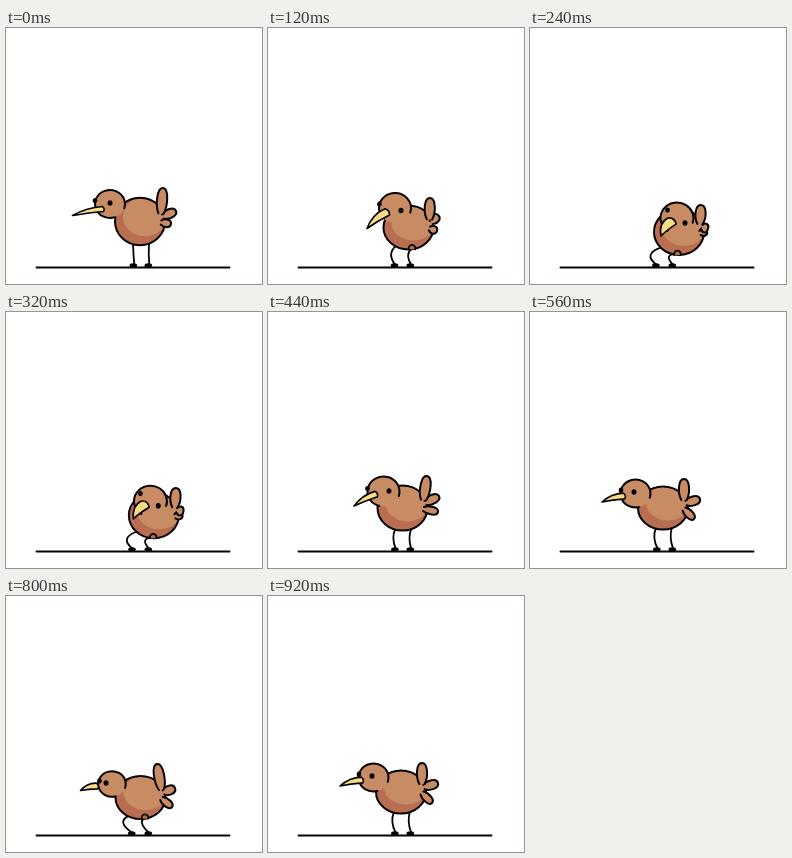
These frames come from a looping animation (256x256 px, 0.96 s). An HTML page with a canvas:

```html
<!DOCTYPE html>
<html lang="en">
<head>
<meta charset="utf-8">
<title>Bird</title>
<style>
html, body { margin: 0; width: 100%; height: 100%; overflow: hidden; background: #fff; }
canvas { display: block; width: 256px; height: 256px; }
</style>
</head>
<body>
<canvas id="stage" width="256" height="256"></canvas>
<script>
const ctx = document.getElementById('stage').getContext('2d');
const INK = '#050304', LIGHT = '#c88c64', SHADE = '#b96e52', YELLOW = '#f4dc84';
const LOOP = 960;

// body: x, y, ry | head: x, y, rx, neck angle | bill: base, tip, half width
// eyes: near, far | tips: three tail feathers | legs: right hip, bend
const poses = [
  { body: [134, 193.5, 23.7], head: [104, 176, 15, 70], bill: [97, 181, 66.5, 187.5, 2.5],
    eyes: [104, 175, 89, 172.5], tips: [157, 160, 170, 183, 165, 196], legs: [143, 0] },
  { body: [140.5, 199.5, 22], head: [127, 180, 16, 140], bill: [119, 184, 99, 200.5, 4],
    eyes: [133, 182.5, 111.5, 176], tips: [162, 170, 170, 187, 169, 203], legs: [144, 4] },
  { body: [149, 204, 23], head: [147, 190, 16.5, 125], bill: [142, 193, 131, 208, 5.2],
    eyes: [155, 195, 137.5, 182], tips: [171, 177, 178, 201, 177, 203], legs: [147.5, 7] },
  { body: [134.5, 196, 22.5], head: [115.5, 179.5, 16, 105], bill: [108, 182, 86, 194, 3],
    eyes: [121, 179, 99.5, 176.5], tips: [159, 164, 171, 184, 170, 200], legs: [143.5, 2] },
  { body: [133, 196, 21.5], head: [105.5, 181.5, 15, 75], bill: [94, 184, 72, 190, 3],
    eyes: [104, 180, 91, 178], tips: [154, 167, 170, 187, 164, 207], legs: [142, 2.5] },
  { body: [134.5, 201.5, 21.5], head: [106, 188, 13.8, 75], bill: [91, 190, 74.5, 194.5, 3],
    eyes: [100, 187, 93.5, 185], tips: [151, 168, 169, 192, 166, 211], legs: [139, 8] }
];

// Position along the poses for each drawing
const track = [0, .5, 1, 1.5, 2, 2.08, 2.6, 3, 3.6, 4, 4.5, 4.85, 5.08, 5, 4.5, 4];

function poseAt(pos) {
  const i = Math.min(Math.floor(pos), poses.length - 2), k = pos - i, out = {};
  for (const key in poses[i]) {
    out[key] = poses[i][key].map((v, j) => v + (poses[i + 1][key][j] - v) * k);
  }
  return out;
}

function paint(fill, width = 2) {
  if (fill) {
    ctx.fillStyle = fill;
    ctx.fill();
  }
  if (width) {
    ctx.lineWidth = width;
    ctx.stroke();
  }
}

function oval(x, y, rx, ry, fill, width) {
  ctx.beginPath();
  ctx.ellipse(x, y, rx, ry, 0, 0, Math.PI * 2);
  paint(fill, width);
}

// Runs draw(length) with the x axis pointing from (x, y) to (tx, ty)
function along(x, y, tx, ty, draw) {
  ctx.save();
  ctx.translate(x, y);
  ctx.rotate(Math.atan2(ty - y, tx - x));
  ctx.beginPath();
  draw(Math.hypot(tx - x, ty - y));
  ctx.restore();
}

function feather(x, y, tx, ty, w) {
  along(x, y, tx, ty, len => {
    ctx.moveTo(0, -w * .5);
    ctx.bezierCurveTo(len * .3, -w * 1.2, len, -w * 1.2, len, 0);
    ctx.bezierCurveTo(len, w * 1.2, len * .3, w * 1.2, 0, w * .5);
    paint(LIGHT);
  });
}

function drawBill([x, y, tx, ty, w]) {
  along(x, y, tx, ty, len => {
    ctx.moveTo(len, 0);
    ctx.quadraticCurveTo(len * .5, w * 1.9, 0, w);
    ctx.quadraticCurveTo(-w * .9, 0, 0, -w);
    ctx.quadraticCurveTo(len * .55, -w * .2, len, 0);
    paint(YELLOW, 1.6);
  });
}

function drawLeg(hipX, hipY, footX, bend) {
  ctx.beginPath();
  ctx.moveTo(hipX, hipY);
  ctx.quadraticCurveTo(footX - bend * 2, 226, footX + 1, 237);
  paint(null, 1.8);
  oval(footX, 237.4, 3.8, 2.1, INK, 0);
}

function drawBody(x, y, ry) {
  oval(x, y, 25, ry, SHADE, 0);
  ctx.save();
  ctx.clip();
  oval(x + 5, y - 5, 22, ry - 4, LIGHT, 0);
  ctx.restore();
  oval(x, y, 25, ry, null, 2);
}

function drawHead([x, y, rx, neck]) {
  const rad = Math.PI / 180, ry = rx - 1;
  oval(x, y, rx, ry, LIGHT, 0);
  ctx.beginPath();
  ctx.ellipse(x, y, rx, ry, 0, neck * rad, 378 * rad);
  paint(null, 2);
}

function drawBird(p) {
  const [bx, by, ry] = p.body, [hip, bend] = p.legs, t = p.tips;
  const edge = x => by + ry * Math.sqrt(Math.max(0, 1 - ((x - bx) / 25) ** 2));

  drawLeg(hip - 16, edge(hip - 16) - 1, 127.3 - bend * .2, bend);
  drawLeg(hip, edge(hip) - 1, 142.3, bend * .7);
  drawBody(bx, by, ry);
  if (bend > 3) {
    ctx.beginPath();
    ctx.arc(hip, edge(hip) - 1, 3.3, Math.PI * .9, Math.PI * 2.1);
    paint(SHADE, 1.8);
  }

  feather(bx + 21, by + 1, t[4], t[5], 4);
  feather(bx + 23, by - 5, t[2], t[3], 4.6);
  feather(bx + 21, by - 8, t[0], t[1], 5.2);

  drawHead(p.head);
  const [ex, ey, fx, fy] = p.eyes;
  oval(fx, fy, 2.3, 2.6, INK, 0);
  oval(ex, ey, 2.5, 2.8, INK, 0);
  drawBill(p.bill);
}

function drawGround() {
  ctx.beginPath();
  ctx.moveTo(30.5, 239.5);
  ctx.lineTo(223.5, 239.5);
  paint(null, 1.9);
}

function frame() {
  const t = performance.now() % LOOP;
  const step = 2 * Math.floor(t / 120) + (t % 120 >= 80 ? 1 : 0);
  ctx.fillStyle = '#fff';
  ctx.fillRect(0, 0, 256, 256);
  ctx.strokeStyle = INK;
  ctx.lineCap = ctx.lineJoin = 'round';
  drawGround();
  drawBird(poseAt(track[step]));
  requestAnimationFrame(frame);
}
frame();
</script>
</body>
</html>
```
